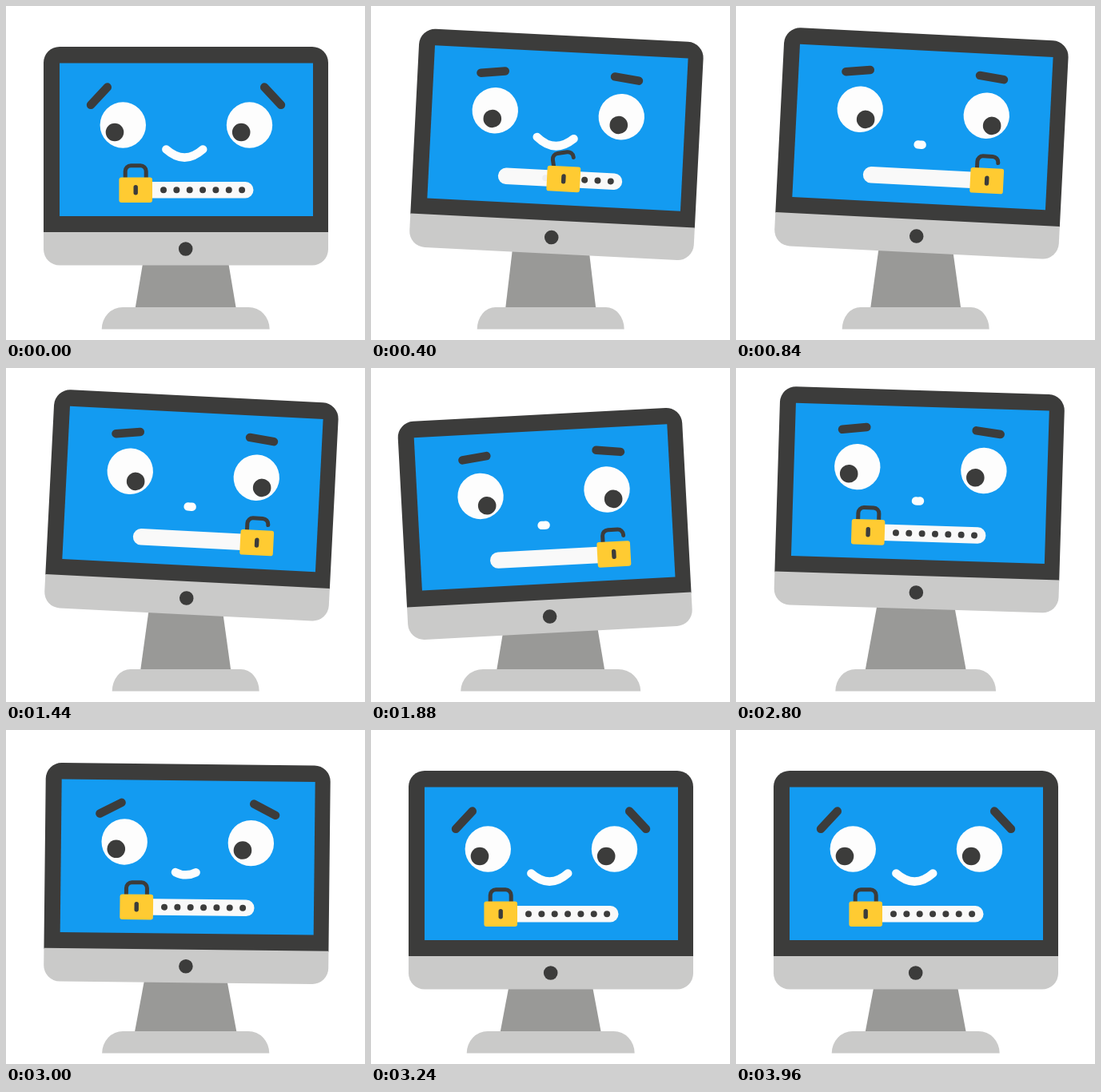
Animation of 449 by 418 pixels, one loop 4 s. Source, as an HTML page:

```html
<!DOCTYPE html>
<html lang="en">
<head>
<meta charset="utf-8">
<title>Locked monitor</title>
<style>
  html, body { margin: 0; width: 100%; height: 100%; overflow: hidden; background: #fff; }
  svg { display: block; width: 100%; height: 100%; }
  .dark { fill: #3c3c3b; }
  .light { fill: #cacac9; }
  .white { fill: #fdfdfd; }
  .line { fill: none; stroke: #3c3c3b; stroke-linecap: round; stroke-linejoin: round; }
</style>
</head>
<body>
<svg viewBox="0 0 449 418">
  <path id="neck" fill="#999997"/>
  <path id="base" class="light"/>
  <g id="head">
    <path class="dark" d="M47 284V71a20 20 0 0 1 20-20H383a20 20 0 0 1 20 20V284Z"/>
    <path class="light" d="M47 283H403V304.500a20 20 0 0 1-20 20H67a20 20 0 0 1-20-20Z"/>
    <rect x="67" y="71.500" width="317" height="191.500" fill="#139bf1"/>
    <circle class="dark" cx="224.700" cy="304" r="8.800"/>
    <circle class="white" cx="146.300" cy="149" r="28.700"/>
    <circle class="white" cx="304.500" cy="149" r="28.700"/>
    <g id="pupils" class="dark">
      <circle cx="146.300" cy="149" r="11.300"/>
      <circle cx="304.500" cy="149" r="11.300"/>
    </g>
    <path id="browL" class="line" stroke-width="10.500" d="M-15.200 0H15.200"/>
    <path id="browR" class="line" stroke-width="10.500" d="M-15.200 0H15.200"/>
    <path id="mouth" fill="none" stroke="#fdfdfd" stroke-width="10.400" stroke-linecap="round"/>
    <rect x="154" y="220" width="155.500" height="20.500" rx="10.200" fill="#f9f9f9"/>
    <g id="dots" class="dark"></g>
    <g id="lock">
      <path id="shackle" class="line" stroke-width="5"/>
      <rect x="-20.800" y="-15.700" width="41.600" height="31.600" rx="3" fill="#ffcb32"/>
      <path class="line" stroke-width="5.400" d="M0-3.500V3.500"/>
    </g>
  </g>
</svg>
<script>
const LOOP = 4000, CX = 224.7, PIVOT = 324.5, FLOOR = 377;
const $ = id => document.getElementById(id);
const set = (id, name, value) => $(id).setAttribute(name, value);
const clamp = v => Math.min(1, Math.max(0, v));
const ease = v => v * v * (3 - 2 * v);
const mix = (a, b, k) => a + (b - a) * k;
const ramp = (t, from, to) => ease(clamp((t - from) / (to - from)));
// goes 0 to 1 and later back to 0
const trip = (t, a, b, c, d) => ramp(t, a, b) - ramp(t, c, d);

// time, lift, tilt, base half width, neck half width, neck slope
const poses = [
  [0, 0, 0, 105, 63, .17],
  [90, 5, -.5, 109, 65.5, .17],
  [250, -33, 3.3, 90, 55, .13],
  [400, -14.5, 2.9, 92, 56.5, .12],
  [560, -16, 2.9, 92, 56.5, .14],
  [1440, -16, 2.9, 92, 56.5, .14],
  [1540, -28, 4.1, 90, 55.5, .14],
  [1780, 12, -4, 115, 69, .17],
  [1880, 7, -3.06, 112.5, 67.5, .17],
  [2360, 7, -3.06, 112.5, 67.5, .17],
  [2560, 18, -5.2, 115, 69, .17],
  [2890, -32, 3.3, 97.2, 61.7, .187],
  [3080, 6, -1, 109, 65, .19],
  [3220, 0, 0, 105, 63, .19],
  [LOOP, 0, 0, 105, 63, .19]
];

function poseAt(t) {
  const i = poses.findIndex(p => p[0] > t);
  const a = poses[i - 1], b = poses[i];
  const k = ramp(t, a[0], b[0]);
  return a.slice(1).map((v, n) => mix(v, b[n + 1], k));
}

const dots = Array.from({ length: 7 }, (_, i) => {
  const dot = document.createElementNS($("dots").namespaceURI, "circle");
  dot.setAttribute("cx", 197 + i * 16.35);
  dot.setAttribute("cy", 230.2);
  dot.setAttribute("r", 4);
  $("dots").append(dot);
  return dot;
});

function drawStand(half, neck, slope) {
  const top = 280, narrow = neck - slope * (FLOOR - top);
  set("neck", "d", `M${CX - neck} ${FLOOR + 1}L${CX - narrow} ${top}H${CX + narrow}L${CX + neck} ${FLOOR + 1}Z`);
  const r = half * .25;
  set("base", "d", `M${CX - half} 404.500A${r} 27.500 0 0 1 ${CX - half + r} ${FLOOR}` +
    `H${CX + half - r}A${r} 27.500 0 0 1 ${CX + half} 404.500Z`);
}

function drawFace(t) {
  const look = trip(t, 180, 680, 2140, 2620);
  set("pupils", "transform", `translate(${mix(-10.3, 7.5, look)} ${mix(9, 12.3, look)})`);

  const raise = trip(t, 80, 320, 2860, 3140);
  const dx = mix(108.6, 83.8, raise), y = mix(112.7, 101, raise), angle = mix(47, 7, raise);
  set("browL", "transform", `translate(${225 - dx} ${y}) rotate(${-angle})`);
  set("browR", "transform", `translate(${225 + dx} ${y}) rotate(${angle})`);

  // symmetric part of the smile curve
  const s = mix(1, .11, trip(t, 560, 840, 2860, 3140));
  const w = 23 * s, bend = 10.2 * s * s;
  set("mouth", "d", `M${223.3 - w} ${189.6 - bend}Q223.300 ${189.6 + bend} ${223.3 + w} ${189.6 - bend}`);
}

function drawLock(t) {
  const x = mix(162.2, 309, trip(t, 160, 640, 2140, 2620));
  set("lock", "transform", `translate(${x} 230.200)`);
  const leg = mix(-14, -22.7, trip(t, 100, 240, 2600, 2720));
  const swing = -11 * trip(t, 120, 380, 420, 700);
  set("shackle", "d", `M-13-14V-23.500a7 7 0 0 1 7-7H6a7 7 0 0 1 7 7V${leg}`);
  set("shackle", "transform", `rotate(${swing} -13 -15)`);
  dots.forEach(dot => dot.setAttribute("opacity", clamp((dot.getAttribute("cx") - x + 24) / 24)));
}

function draw(t) {
  const [lift, tilt, half, neck, slope] = poseAt(t);
  set("head", "transform", `translate(0 ${lift}) rotate(${tilt} ${CX} ${PIVOT})`);
  drawStand(half, neck, slope);
  drawFace(t);
  drawLock(t);
}

const start = performance.now();
function tick() {
  draw((performance.now() - start) % LOOP);
  requestAnimationFrame(tick);
}
tick();
</script>
</body>
</html>
```
